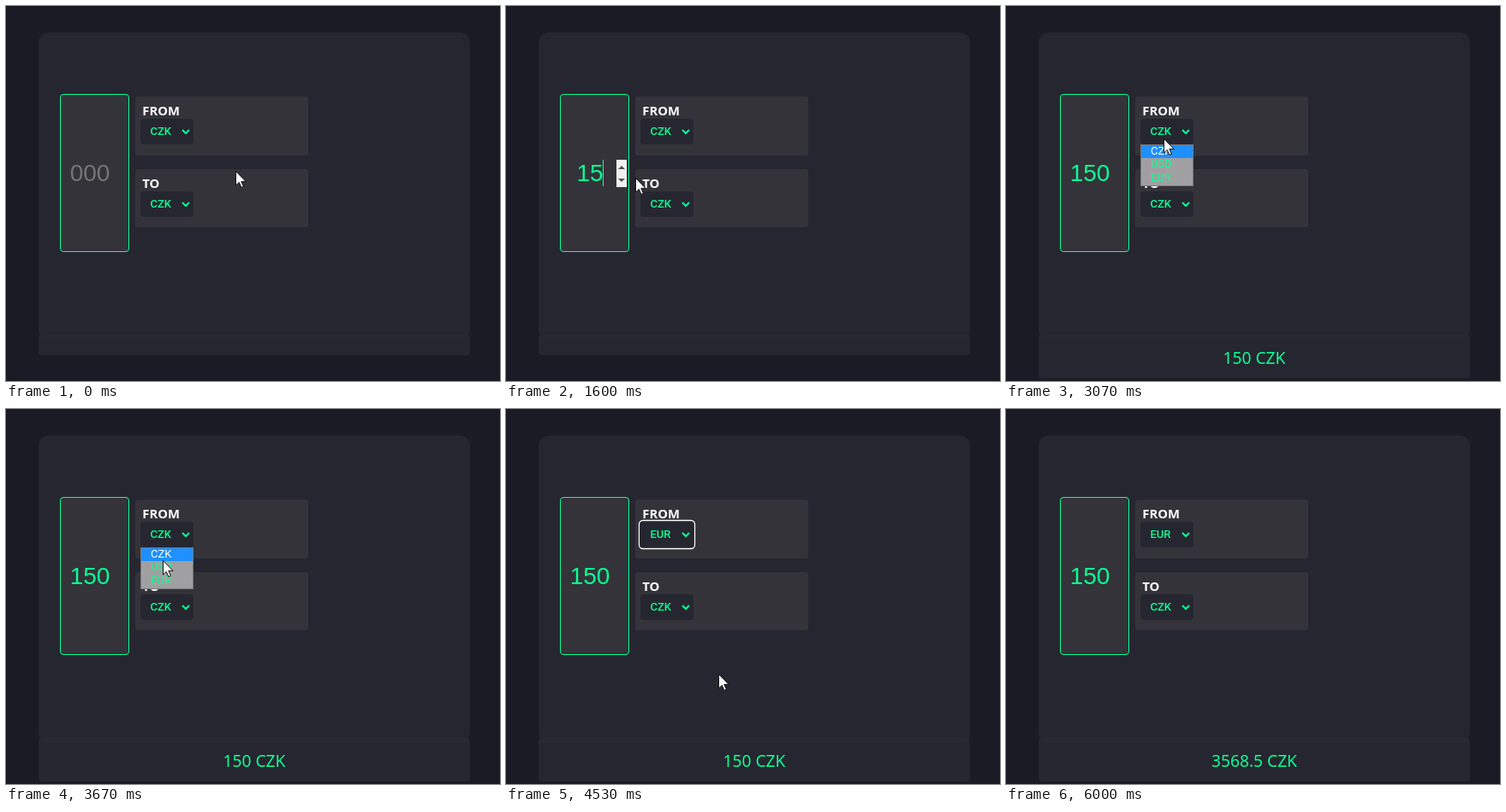
Animation of 577x439 px, one loop 6540 ms. Source, as an HTML page:

```html
<!DOCTYPE html>
<html lang="en">
<head>
<meta charset="utf-8">
<title>Currency converter</title>
<style>
  html, body { margin: 0; width: 100%; height: 100%; overflow: hidden; background: #1b1b25; }
  svg { display: block; --green: #0cff93; }
  text { fill: var(--green); white-space: pre; }
  .label { font: 700 14.8px "Open Sans", "Noto Sans", sans-serif; fill: #fff; }
  .code { font: 500 13px Roboto, Arial, sans-serif; }
  .option { font: 400 13px Roboto, Arial, sans-serif; }
  .amount { font: 28px "Liberation Sans", Arial, sans-serif; text-anchor: middle; }
  .result { font: 19.2px "Noto Sans", "Open Sans", sans-serif; }
</style>
</head>
<body>
<svg width="577" height="439" viewBox="0 0 577 439">
  <defs>
    <g id="select">
      <rect x="157" y="132" width="62" height="30" rx="4" fill="#262630"/>
      <path d="M206 145l4 4 4-4" fill="none" stroke="var(--green)" stroke-width="2"/>
    </g>
  </defs>

  <rect x="38" y="31" width="504" height="360" rx="12" fill="#262630"/>
  <rect id="footer" x="38" y="385" width="504" rx="4" fill="#262630"/>
  <rect x="39" y="385" width="502" height="6" rx="5" fill="#292932"/>

  <rect x="63.5" y="103.5" width="80" height="184" rx="3.5" fill="#333339" stroke="var(--green)"/>
  <text id="amount" class="amount" x="98" y="205"></text>
  <rect id="caret" y="180" width="1" height="31" fill="var(--green)"/>
  <g id="spinner">
    <rect x="129" y="180" width="12" height="32" fill="#f0f0f0"/>
    <path d="M131 191l4-4 4 4zM131 202l4 4 4-4z" fill="#505050"/>
  </g>

  <rect x="151" y="106" width="202" height="69" rx="3" fill="#333339"/>
  <rect x="151" y="191" width="202" height="68" rx="3" fill="#333339"/>
  <text class="label" x="159.3" y="128">FROM</text>
  <text class="label" x="159.3" y="213">TO</text>
  <use href="#select"/>
  <use href="#select" y="85"/>
  <text id="from" class="code" x="168.4" y="151"></text>
  <text class="code" x="168.4" y="236">CZK</text>
  <g id="ring" fill="none">
    <rect x="156.5" y="131.5" width="63" height="31" rx="4" stroke="#101014"/>
    <rect x="155.5" y="130.5" width="65" height="33" rx="4.5" stroke="#fff" stroke-width="1.3"/>
  </g>

  <g id="menu">
    <rect x="157.5" y="162.5" width="61" height="48" fill="#a0a0a2" stroke="#77777b"/>
    <rect id="highlight" x="158" width="60" height="15" fill="#1e90ff"/>
  </g>

  <rect id="selection" x="240" y="397" height="27" fill="#0a63d2"/>
  <text id="result" class="result" y="419"><tspan id="picked" fill="#fff"></tspan><tspan id="rest"></tspan></text>

  <path id="arrow" d="M.5 .5v16.5l3.8-3.6 2.6 6 2.5-1.1-2.6-5.9h5.2z" fill="#fff" stroke="#111"/>
  <path id="beam" d="M-3 -7.5h2.5l.5 .5 .5-.5h2.5M0 -7v14M-3 7.5h2.5l.5-.5 .5 .5h2.5" fill="none" stroke="#d0d0d2"/>
</svg>
<script>
const LOOP = 6540;
const STEP = 1000 / 15;
const BLINK = 8;
const CODES = ['CZK', 'USD', 'EUR'];

// Steps at which the user acts
const focusAt = 12, typeAt = 22, blurAt = 39, openAt = 42, chooseAt = 64;
const convertAt = 73, dragAt = 79, deselectAt = 87, leaveAt = 90;

const $ = id => document.getElementById(id);
const show = (id, on) => $(id).style.display = on ? '' : 'none';
const set = (id, attrs) => {
  for (const name in attrs) $(id).setAttribute(name, attrs[name]);
};
const clamp = (value, low, high) => Math.max(low, Math.min(high, value));

// Glides of the pointer; lift bends the line upwards
const glide = (start, end, x, y, lift = 0) => ({ start, end, x, y, lift });
const glides = [
  glide(0, 10, 122, 168, 36),
  glide(focusAt - 1, 14, 151, 201),
  glide(30, 36, 178, 157),
  glide(36, blurAt, 184, 142),
  glide(openAt - 1, 55, 183, 177),
  glide(56, 62, 185, 197),
  glide(chooseAt, 71, 295, 384, -6),
  glide(convertAt - 1, dragAt - 1, 240, 406),
  glide(dragAt, 81, 271, 406),
  glide(81, 85, 354, 406),
  glide(deselectAt - 1, leaveAt, 184, 439)
];

function pointerAt(step) {
  let x = 268, y = 193;
  for (const g of glides) {
    const k = clamp((step - g.start) / (g.end - g.start), 0, 1);
    x += (g.x - x) * k;
    y += (g.y - y) * k - g.lift * Math.sin(Math.PI * k);
  }
  return [Math.round(x), Math.round(y)];
}

const options = CODES.map((code, i) => {
  const option = document.createElementNS('http://www.w3.org/2000/svg', 'text');
  option.setAttribute('class', 'option');
  option.setAttribute('x', 169);
  option.setAttribute('y', 174 + i * 15.3);
  option.textContent = code;
  $('menu').append(option);
  return option;
});

function drawField(step, x) {
  const typed = step < typeAt ? 0 : clamp(Math.ceil((step - typeAt + 1) / 1.5), 1, 3);
  $('amount').textContent = typed ? '150'.slice(0, typed) : '000';
  $('amount').style.fill = typed ? '' : '#757575';
  set('caret', { x: Math.round(98 + typed * 7.785 - 0.4) });
  const isLit = since => step >= since && step < since + BLINK;
  show('caret', isLit(focusAt) || isLit(typeAt) || isLit(typeAt + 3));
  show('spinner', step < blurAt && (step >= focusAt || x < 144));
}

function drawMenu(step, y) {
  const row = clamp(Math.floor((y - 162.5) / 15.5), 0, 2);
  show('menu', step >= openAt && step < chooseAt);
  set('highlight', { y: 163 + row * 15.5 });
  options.forEach((option, i) => option.style.fill = i === row ? '#fff' : '');
  $('from').textContent = CODES[step < chooseAt ? 0 : 2];
  show('ring', step >= chooseAt && step < convertAt);
}

function drawResult(step, x) {
  const converted = step >= convertAt;
  const text = step < blurAt ? '' : converted ? '3568.5 CZK' : '150 CZK';
  const dragging = step >= dragAt && step < deselectAt;
  const count = dragging ? clamp(Math.round((x - 245) / 10.8), 0, text.length) : 0;
  set('footer', { height: text ? 51 : 24 });
  set('result', { x: converted ? 240 : 253.5 });
  $('picked').textContent = text.slice(0, count);
  $('rest').textContent = text.slice(count);
  set('selection', { width: count ? $('result').getSubStringLength(0, count) : 0 });
}

function drawPointer(step, x, y) {
  const overText = step >= convertAt && y > 397 && y < 425 && x > 235 && x < 345;
  const beam = x < 144 || overText;
  show('arrow', step < leaveAt && !beam);
  show('beam', step < leaveAt && beam);
  set('arrow', { transform: `translate(${x} ${y})` });
  set('beam', { transform: `translate(${x + 0.5} ${y})` });
}

function draw(time) {
  const step = Math.floor((time + 5) / STEP);
  const [x, y] = pointerAt(step);
  drawField(step, x);
  drawMenu(step, y);
  drawResult(step, x);
  drawPointer(step, x, y);
}

const start = performance.now();
function tick() {
  draw((performance.now() - start) % LOOP);
  requestAnimationFrame(tick);
}
tick();
</script>
</body>
</html>
```
